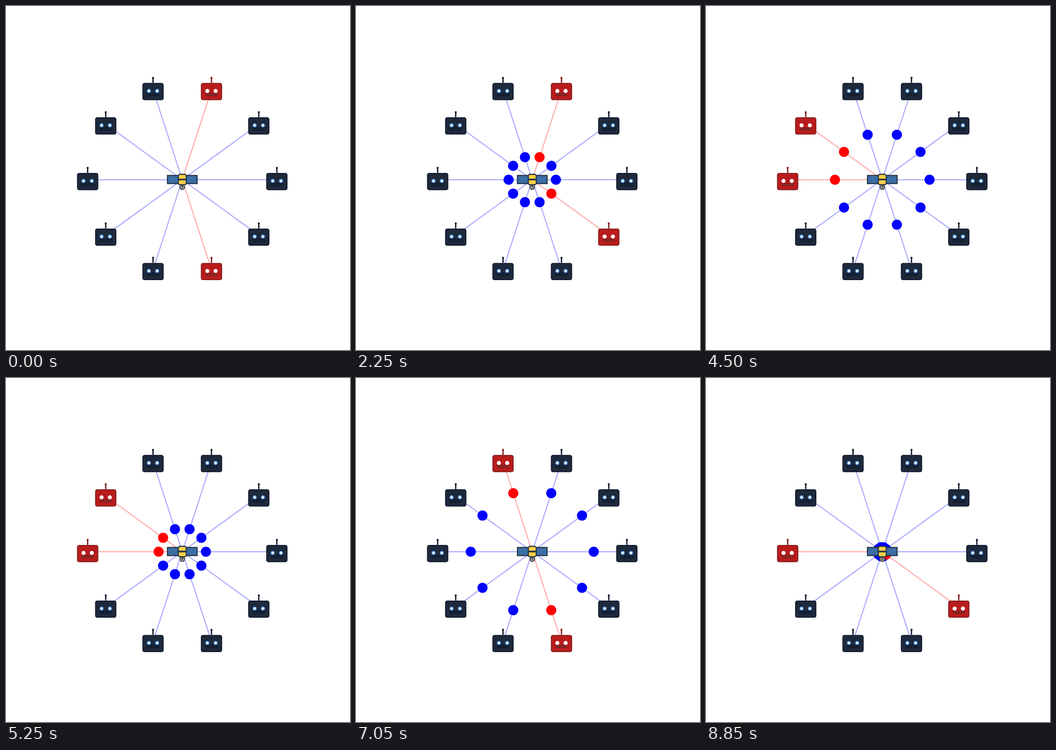
An HTML page that plays this animation: 748x748 px, repeating every 9 s.

```html
<!DOCTYPE html>
<html lang="en">
<head>
<meta charset="utf-8">
<title>Robots reporting to a hub</title>
<style>
  html, body { margin: 0; width: 100%; height: 100%; overflow: hidden; background: #fff; }
  svg { display: block; width: 100%; height: 100%; }
  .link { stroke: #b0b0ff; stroke-width: 2.5; }
  .link.bad { stroke: #ffb0b0; }
  .dot { fill: #00f; }
  .dot.bad { fill: #f00; }
  .robot { --shell: #1e293b; --edge: #0f172a; --iris: #60a5fa; --teeth: #26344a; }
  .robot.bad { --shell: #b91c1c; --edge: #7f1d1d; --iris: #fff; --teeth: #8a3a34; }
  .shell { fill: var(--shell); stroke: var(--edge); stroke-width: 1.8; }
  .stem { stroke: var(--edge); stroke-width: 2.8; }
  .tip, .mouth { fill: var(--edge); }
  .iris { fill: var(--iris); }
  .pupil { fill: #fff; }
  .teeth { stroke: var(--teeth); stroke-width: .9; fill: none; }
</style>
</head>
<body>
<svg viewBox="0 0 748 748">
  <defs>
    <g id="robot">
      <path class="stem" d="M0-15V-25"/>
      <circle class="tip" cy="-25.8" r="2.2"/>
      <rect class="shell" x="-22.2" y="-13.8" width="44.4" height="35.6" rx="3.6"/>
      <circle class="iris" cx="-9" cy="2.7" r="4.4"/>
      <circle class="iris" cx="9" cy="2.7" r="4.4"/>
      <circle class="pupil" cx="-9" cy="2.7" r="2.4"/>
      <circle class="pupil" cx="9" cy="2.7" r="2.4"/>
      <rect class="mouth" x="-12.6" y="7.4" width="25.2" height="6.2" rx="1"/>
      <path class="teeth" d="M-11.5 10.5H11.5M-7.5 8V13M-2.5 8V13M2.5 8V13M7.5 8V13"/>
    </g>
  </defs>
  <g id="links"></g>
  <g id="dots"></g>
  <g id="robots"></g>
  <g transform="translate(383.3 377.3)" stroke="#243447" stroke-width="2.4">
    <rect x="-32.2" y="-8.8" width="24" height="17.6" fill="#3b6ea5"/>
    <rect x="8.2" y="-8.8" width="24" height="17.6" fill="#3b6ea5"/>
    <circle cy="16.5" r="5" fill="#a0a0a0" stroke="#4b4f55"/>
    <path d="M0 11V17.5" stroke="#4b4f55" stroke-width="3"/>
    <rect x="-8.6" y="-11.3" width="17.2" height="22.8" rx="3.6" fill="#f7d148"/>
    <path d="M-10 0H10" stroke-width="3.6"/>
  </g>
</svg>
<script>
const CX = 383.25, CY = 377.7, RADIUS = 205.7, COUNT = 10;
const STEP = 150, LOOP = 9000, TRIP = 20, SHIFT = 10;
// Red robots for each block of SHIFT steps, counted counter-clockwise from the right.
const BAD = [[2, 8], [2, 9], [1, 4], [4, 5], [3, 8], [5, 9]];

function add(layer, tag, cls, attrs) {
  const el = document.createElementNS("http://www.w3.org/2000/svg", tag);
  el.setAttribute("class", cls);
  for (const key in attrs) el.setAttribute(key, attrs[key]);
  return document.getElementById(layer).appendChild(el);
}

const nodes = Array.from({ length: COUNT }, (_, i) => {
  const angle = i * 2 * Math.PI / COUNT;
  const dx = RADIUS * Math.cos(angle), dy = -RADIUS * Math.sin(angle);
  const x = CX + dx, y = CY + dy;
  return {
    dx, dy,
    link: add("links", "line", "link", { x1: CX, y1: CY, x2: x, y2: y }),
    dot: add("dots", "circle", "dot", { r: 11 }),
    robot: add("robots", "use", "robot", { href: "#robot", x, y })
  };
});

function draw(time) {
  const step = Math.floor(time % LOOP / STEP);
  const reach = 1 - step % TRIP / TRIP;
  const bad = BAD[Math.floor(step / SHIFT)];
  nodes.forEach((n, i) => {
    for (const el of [n.link, n.dot, n.robot]) el.classList.toggle("bad", bad.includes(i));
    n.dot.setAttribute("cx", CX + n.dx * reach);
    n.dot.setAttribute("cy", CY + n.dy * reach);
  });
}

const start = performance.now();
function tick() {
  draw(performance.now() - start);
  requestAnimationFrame(tick);
}
tick();
</script>
</body>
</html>
```
